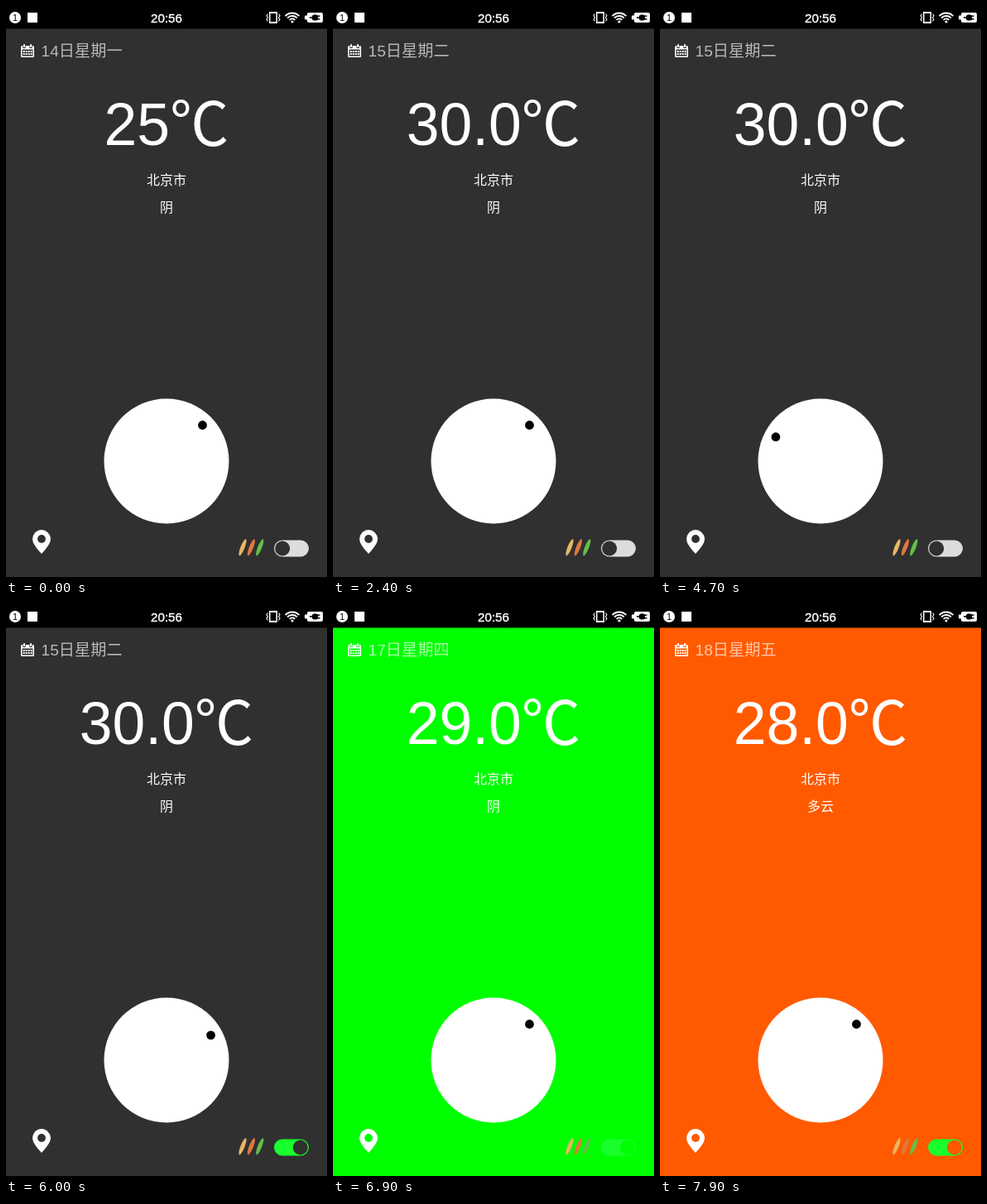
An HTML page with a canvas for the animation above (8 s loop, 388x690 px).

```html
<!DOCTYPE html>
<html lang="zh">
<head>
<meta charset="utf-8">
<title>Weather dial</title>
<style>
html, body { margin: 0; width: 100%; height: 100%; overflow: hidden; background: #303030; }
canvas { display: block; width: 388px; height: 690px; }
</style>
</head>
<body>
<canvas id="stage"></canvas>
<script>
const W = 388, H = 690, LOOP = 8000, STEP = 100;
const FONT = '"Liberation Sans", "Noto Sans CJK SC", "Noto Sans CJK", sans-serif';
const CJK = '"Noto Sans CJK SC", "Noto Sans CJK", sans-serif';
const DARK = '#303030', WHITE = '#fff', BLACK = '#000';

const canvas = document.getElementById('stage');
const ctx = canvas.getContext('2d');
const ratio = window.devicePixelRatio || 1;
canvas.width = W * ratio;
canvas.height = H * ratio;

const days = [
  ['14日星期一', '25', '阴'],
  ['15日星期二', '30.0', '阴'],
  ['16日星期三', '29.0', '雷阵雨'],
  ['17日星期四', '29.0', '阴'],
  ['18日星期五', '28.0', '多云']
];

// Each swing turns the dial out and back; the day changes at its peak.
const swings = [
  { at: 1000, dir: 1 }, { at: 2700, dir: 1 }, { at: 3500, dir: 1 },
  { at: 4100, dir: -1 }, { at: 4700, dir: -1 },
  { at: 6150, dir: 1, hue: 253.6 }, { at: 6650, dir: 1, hue: 120 },
  { at: 7150, dir: 1, hue: 94.6 }, { at: 7600, dir: 1, hue: 21.2 }
];
const HALF_SWING = 200, REST = -Math.PI / 4, REACH = 1.86;
const TOGGLE_AT = 5500;

function dialAngle(t) {
  const swing = swings.find(s => Math.abs(t - s.at) < HALF_SWING);
  if (!swing) return REST;
  const phase = (t - swing.at) / HALF_SWING;
  return REST + swing.dir * REACH * Math.cos(phase * Math.PI / 2) ** 2;
}

function stateAt(t) {
  const done = swings.filter(s => t >= s.at);
  const steps = done.reduce((sum, s) => sum + s.dir, 0);
  const hue = done.length ? done[done.length - 1].hue : undefined;
  return {
    day: days[Math.min(steps, days.length - 1)],
    bg: hue === undefined ? DARK : `hsl(${hue}, 100%, 50%)`
  };
}

function disc(x, y, r, color) {
  ctx.fillStyle = color;
  ctx.beginPath();
  ctx.arc(x, y, r, 0, Math.PI * 2);
  ctx.fill();
}

function box(x, y, w, h, color, r = 0) {
  ctx.fillStyle = color;
  ctx.beginPath();
  ctx.roundRect(x, y, w, h, r);
  ctx.fill();
}

function line(points, width, color = WHITE) {
  ctx.strokeStyle = color;
  ctx.lineWidth = width;
  ctx.beginPath();
  points.forEach(([x, y]) => ctx.lineTo(x, y));
  ctx.stroke();
}

function text(str, x, y, size, align = 'center', color = WHITE, family = FONT) {
  ctx.font = `${size}px ${family}`;
  ctx.textAlign = align;
  ctx.fillStyle = color;
  ctx.fillText(str, x, y);
}

function wifi(x, y) {
  ctx.strokeStyle = WHITE;
  ctx.lineWidth = 1.9;
  for (const r of [4.5, 8, 11.5]) {
    ctx.beginPath();
    ctx.arc(x, y, r, -Math.PI * 0.76, -Math.PI * 0.24);
    ctx.stroke();
  }
  disc(x, y - 1, 1.6, WHITE);
}

function vibrate(x, y) {
  ctx.strokeStyle = WHITE;
  ctx.lineWidth = 1.5;
  ctx.strokeRect(x - 4.2, y - 6.3, 8.4, 12.6);
  box(x - 4.2, y - 7, 8.4, 2, WHITE);
  box(x - 4.2, y + 5, 8.4, 2, WHITE);
  for (const s of [-1, 1]) {
    line([[-4.5, 6.5], [-2.2, 8], [0, 6.5], [2.2, 8], [4.5, 6.5]]
      .map(([dy, dx]) => [x + s * dx, y + dy]), 1.1);
  }
}

function battery() {
  box(364, 8, 19, 12, WHITE, 2);
  box(361, 11.5, 4, 5, WHITE, 1);
  box(370, 10.5, 7, 7, BLACK, 2.5);
  box(367, 13.2, 4, 1.6, BLACK);
  box(376, 11.4, 3.5, 1.5, BLACK);
  box(376, 15.1, 3.5, 1.5, BLACK);
}

function statusBar() {
  box(0, 0, W, 27.5, BLACK);
  disc(11, 14, 7, WHITE);
  text('1', 11, 18, 11, 'center', BLACK);
  box(26, 8, 12, 12, WHITE);
  text('20:56', 194, 20, 15.2);
  ctx.strokeStyle = WHITE;
  ctx.lineWidth = 0.4;
  ctx.strokeText('20:56', 194, 20);
  vibrate(323, 14);
  wifi(346, 20);
  battery();
}

function calendar(bg) {
  box(18, 48, 16, 14, WHITE, 1.5);
  box(19.5, 52.5, 13, 8, bg);
  for (const x of [21, 29]) {
    box(x - 0.6, 46, 3.2, 5, bg);
    box(x, 46, 2, 4, WHITE, 1);
  }
  for (let i = 0; i < 8; i++) {
    box(20.7 + (i % 4) * 3, 54 + (i >> 2) * 3, 2, 2, WHITE);
  }
}

function pin(bg) {
  ctx.fillStyle = WHITE;
  ctx.beginPath();
  ctx.arc(43, 644, 11, Math.PI * 0.88, Math.PI * 0.12);
  ctx.quadraticCurveTo(50.5, 654, 43, 662);
  ctx.quadraticCurveTo(35.5, 654, 32.8, 648.2);
  ctx.fill();
  disc(43, 644, 4.9, bg);
}

function leaves() {
  ['#e6b765', '#df783f', '#62bf48'].forEach((color, i) => {
    ctx.fillStyle = color;
    ctx.beginPath();
    ctx.ellipse(286 + i * 10.4, 654.3, 2.5, 10.8, 0.38, 0, Math.PI * 2);
    ctx.fill();
  });
}

function toggle(on, bg) {
  box(324, 645.5, 42, 20, on ? '#19ff2d' : '#dcdcdc', 10);
  disc(on ? 355.8 : 334.2, 655.5, 9, bg);
}

function dial(angle) {
  disc(194, 550, 75.5, WHITE);
  disc(194 + 61.5 * Math.cos(angle), 550 + 61.5 * Math.sin(angle), 5.4, BLACK);
}

function temperature(value) {
  const size = 71.5;
  ctx.font = `${size}px ${FONT}`;
  const width = ctx.measureText(value).width;
  const x = W / 2 - (width + size) / 2;
  text(value, x, 168, size, 'left');
  text('℃', x + width, 168, size, 'left', WHITE, CJK);
}

function draw(t) {
  const { day: [date, degrees, sky], bg } = stateAt(t);
  ctx.setTransform(ratio, 0, 0, ratio, 0, 0);
  box(0, 0, W, H, bg);
  statusBar();
  calendar(bg);
  text(date, 42.5, 61, 19.2, 'left', 'rgba(255,255,255,0.66)');
  temperature(degrees);
  text('北京市', 194, 216, 16);
  text(sky, 194, 249, 16);
  dial(dialAngle(t));
  pin(bg);
  leaves();
  toggle(t >= TOGGLE_AT, bg);
}

const start = performance.now();
function frame() {
  const t = (performance.now() - start) % LOOP;
  draw(Math.floor(t / STEP) * STEP);
  requestAnimationFrame(frame);
}
frame();
</script>
</body>
</html>
```
